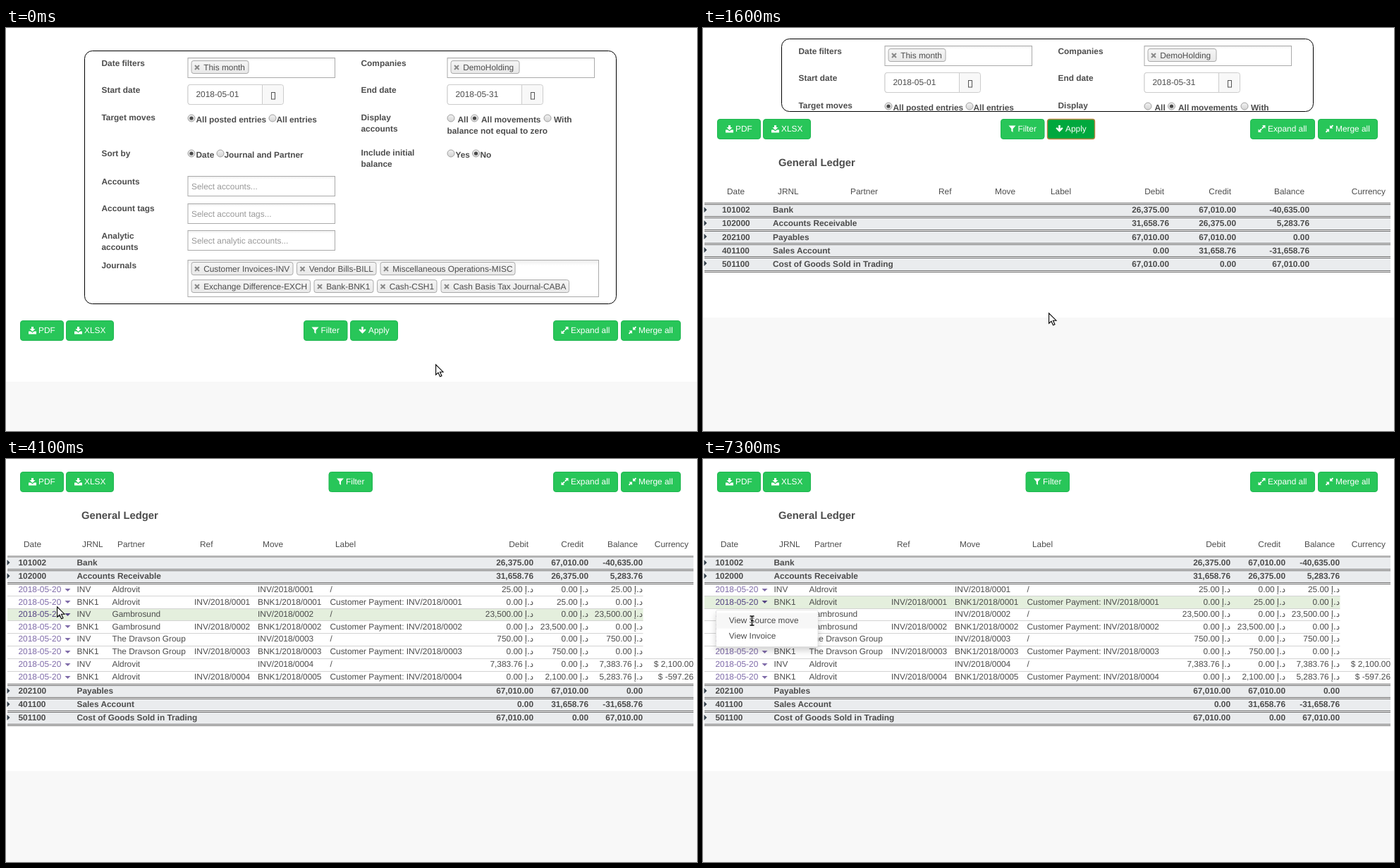
An HTML page for the animation above (8 s loop, 980 by 572 pixels).

```html
<!DOCTYPE html>
<html lang="en">
<head>
<meta charset="utf-8">
<title>General Ledger</title>
<style>
html, body { margin: 0; width: 100%; height: 100%; overflow: hidden; background: #fff; }
#stage { display: block; width: 980px; height: 572px; }
text { font: 11.88px "Liberation Sans", Arial, sans-serif; fill: #4c4c4c; white-space: pre; text-rendering: geometricPrecision; }
.b { font-weight: bold; }
.e { text-anchor: end; }
.w, .icon { fill: #fff; }
.ph { fill: #999; }
.title { font-size: 14.85px; font-weight: bold; }
.cur { font-family: "DejaVu Sans", sans-serif; text-anchor: end; }
.link { fill: #7f6ba9; }
.link.on { fill: #544383; }
.btn { fill: #28c659; stroke: #1eb650; }
.btn.on { fill: #00a83e; stroke: #009638; }
.field { fill: url(#sunk); stroke: #aaa; }
.tag { fill: url(#raised); stroke: #aaa; }
.menu { fill: #fff; stroke: #d9d9d9; stroke-width: .6; filter: drop-shadow(0 5px 5px rgba(0, 0, 0, .18)); }
.pointer { fill: #fff; stroke: #000; stroke-width: 1.1; }
</style>
</head>
<body>
<svg id="stage" viewBox="0 0 980 572">
  <defs>
    <linearGradient id="sunk" x2="0" y2="1"><stop offset=".01" stop-color="#eee"/><stop offset=".15" stop-color="#fff"/></linearGradient>
    <linearGradient id="raised" x2="0" y2="1"><stop offset=".2" stop-color="#f3f3f3"/><stop offset="1" stop-color="#e8e8e8"/></linearGradient>
    <linearGradient id="knob" x2="0" y2="1"><stop stop-color="#f2f2f2"/><stop offset="1" stop-color="#d4d4d4"/></linearGradient>
  </defs>
  <g id="scene"></g>
</svg>
<script>
const LOOP = 8000, STEP = 100;
const scene = document.getElementById('scene');

// y is the middle of the capitals; the baseline sits on a whole pixel
const text = (x, y, s, cls = '') => `<text x="${x}" y="${Math.round(y + 4.3)}" class="${cls}">${s}</text>`;
const box = (x, y, w, h, attrs) => `<rect x="${x}" y="${y}" width="${w}" height="${h}" ${attrs}/>`;
const edge = (x, y, w, h, attrs) => box(x + .5, y + .5, w - 1, h - 1, attrs);
const path = (d, attrs = '') => `<path d="${d}" ${attrs}/>`;
const group = (x, y, s) => `<g transform="translate(${x} ${y})">${s}</g>`;

// latest value whose start time has passed
const latest = (list, t) => list.reduce((v, [at, next]) => at <= t ? next : v, list[0][1]);

function glide(keys, t) {
  const i = keys.findIndex(k => k[0] > t);
  if (i === 0) return keys[0].slice(1);
  if (i < 0) return keys[keys.length - 1].slice(1);
  const [a, x0, y0] = keys[i - 1], [b, x1, y1] = keys[i], f = (t - a) / (b - a);
  return [x0 + (x1 - x0) * f, y0 + (y1 - y0) * f];
}

/* ---- filter panel ---- */
const label = (y, ...lines) => lines.map((s, i) => text(0, y + i * 16.3, s, 'b')).join('');
const field = (y, w, h, hint = '') => edge(0, y, w, h, 'class="field"') + text(5.5, y + 14.5, hint, 'ph');
const tag = (x, y, w, s) => edge(x, y, w, 19, 'rx="3" class="tag"') +
  path(`M${x + 5.5} ${y + 7}l6 6m0 -6l-6 6`, 'stroke="#888" stroke-width="2"') + text(x + 17.7, y + 9.5, s);
const radio = (x, y, on) => `<circle cx="${x}" cy="${y}" r="5" fill="url(#knob)" stroke="#a0a0a0"/>` +
  (on ? `<circle cx="${x}" cy="${y}" r="2.6" fill="#484848"/>` : '');
const dateBox = s => edge(0, 80, 136.5, 29, 'rx="3" fill="#f8f8f8" stroke="#ccc"') +
  path('M106 80.5H3.5q-3 0 -3 3v22q0 3 3 3H106z', 'fill="#fff" stroke="#ccc"') + text(12, 94, s) +
  edge(118.5, 91, 6, 10.5, 'fill="none" stroke="#555"');

function panelBody(narrow) {
  const [a, b, c, d] = narrow ? [-1, -3, -7, -9] : [0, 0, 0, 0];
  const names = label(49.5, 'Date filters') + label(87.5, 'Start date') + label(126.5, 'Target moves') +
    label(177.5, 'Sort by') + label(217.5, 'Accounts') + label(256, 'Account tags') +
    label(294.5, 'Analytic', 'accounts') + label(336.5, 'Journals');
  const left = field(42, 209.5, 29) + tag(5, 46, 82, 'This month') + dateBox('2018-05-01') +
    radio(5.5, 128, 1) + text(12, 129.5, 'All posted entries', 'b') + radio(120.5, 128) + text(126, 129.5, 'All entries', 'b') +
    radio(5.5, 178, 1) + text(12, 180, 'Date', 'b') + radio(46.5, 178) + text(52, 180, 'Journal and Partner', 'b') +
    field(210, 209.5, 29, 'Select accounts...') + field(249, 209.5, 29, 'Select account tags...') +
    field(287, 209.5, 29, 'Select analytic accounts...') +
    field(329, narrow ? 574 : 583.5, 53) +
    tag(5, 332, 145, 'Customer Invoices-INV') + tag(154.5, 332, 113.5, 'Vendor Bills-BILL') +
    tag(273, 332, 192, 'Miscellaneous Operations-MISC') + tag(5, 357, 169.5, 'Exchange Difference-EXCH') +
    tag(179, 357, 85, 'Bank-BNK1') + tag(268.5, 357, 85.5, 'Cash-CSH1') + tag(359, 357, 182.5, 'Cash Basis Tax Journal-CABA');
  const names2 = label(49.5, 'Companies') + label(87.5, 'End date') + label(126.5, 'Display', 'accounts') +
    label(176.5, 'Include initial', 'balance');
  const right = field(42, 209.5, 29) + tag(5, 46, 98, 'DemoHolding') + dateBox('2018-05-31') +
    radio(5.5, 128) + text(15, 129.5, 'All', 'b') + radio(39, 128, 1) + text(48.5, 129.5, 'All movements', 'b') +
    radio(142.5, 128) + text(151.5, 129.5, 'With', 'b') + text(0, 146, 'balance not equal to zero', 'b') +
    radio(5.5, 178) + text(12, 180, 'Yes', 'b') + radio(41, 178, 1) + text(47, 180, 'No', 'b');
  return group(135.5 + a, 0, names) + group(257.5 + b, 0, left) + group(503.5 + c, 0, names2) + group(625.5 + d, 0, right);
}

function panel(top, h, narrow) {
  const x = 111 - narrow, w = 755 - 12 * narrow;
  return `<svg x="${x}" y="${top}" width="${w}" height="${h}">${group(-x, -32, panelBody(narrow))}</svg>` +
    edge(x, top, w, h, 'rx="11" fill="none" stroke="#000"');
}

/* ---- buttons ---- */
const ICON = {
  load: 'M-5.5 1.5h3l2.5 2 2.5-2h3v4h-11zM-1.5-5h3v3h2.5l-4 4-4-4h2.5z',
  funnel: 'M-4.5-4.5h10l-4 4.5v5l-2.2-1.8v-3.2z',
  down: 'M-1.3-5h2.6v5l2.2-2 1.6 1.6-5.1 5.2-5.1-5.2 1.6-1.6 2.2 2z',
  grow: 'M5-5v4.5l-1.6-1.6-2.4 2.4-1.3-1.3 2.4-2.4-1.6-1.6zM-5 5v-4.5l1.6 1.6 2.4-2.4 1.3 1.3-2.4 2.4 1.6 1.6z',
  shrink: 'M.5-.5v-4.5l1.6 1.6 2.2-2.2 1.3 1.3-2.2 2.2 1.6 1.6zM-.5 .5v4.5l-1.6-1.6-2.2 2.2-1.3-1.3 2.2-2.2-1.6-1.6z'
};
const button = (x, w, pad, icon, s, on) => edge(x, 0, w, 29, `rx="3.5" class="btn ${on ? 'on' : ''}"`) +
  group(x + pad - 8.5, 14, path(ICON[icon], 'class="icon"')) + text(x + pad, 14, s, 'w');

function toolbar(y, narrow, hidden, hot, focus) {
  const mid = hidden ? 35.5 : narrow ? -7 : 0, end = narrow ? -14 : 0;
  let s = button(20, 62, 26, 'load', 'PDF') + button(85, 68, 26, 'load', 'XLSX') +
    button(422 + mid, 62.5, 24.5, 'funnel', 'Filter') +
    button(776 + end, 92, 25, 'grow', 'Expand all') + button(872 + end, 85, 25, 'shrink', 'Merge all');
  if (!hidden) {
    s += button(488 + mid, 68, 26, 'down', 'Apply', hot);
    if (focus) s += edge(488 + mid, 0, 68, 29, 'rx="3" fill="none" stroke="#b5843f" stroke-width="1.4"');
  }
  return group(0, y, s);
}

/* ---- ledger ---- */
const HEADS = ['Date', 'JRNL', 'Partner', 'Ref', 'Move', 'Label', 'Debit', 'Credit', 'Balance', 'Currency'];
const WIDE = { heads: [34, 106, 209, 334, 414, 493, 654, 749, 853, 968], code: 27, name: 99, right: 975 };
const NARROW = { heads: [34, 105, 207, 330, 409, 486.5, 644, 739, 842, 955], code: 27, name: 98, right: 962 };
const OPEN = { heads: [25, 108, 158, 275, 364, 467, 741, 819, 896, 968], code: 17.5, name: 100.5, right: 975 };
const ACCOUNTS = [
  ['101002', 'Bank', '26,375.00', '67,010.00', '-40,635.00'],
  ['102000', 'Accounts Receivable', '31,658.76', '26,375.00', '5,283.76'],
  ['202100', 'Payables', '67,010.00', '67,010.00', '0.00'],
  ['401100', 'Sales Account', '0.00', '31,658.76', '-31,658.76'],
  ['501100', 'Cost of Goods Sold in Trading', '67,010.00', '0.00', '67,010.00']
];
// partner, invoice number, payment number, sums of the invoice line, sums of the payment line
const DEALS = [
  ['Aldrovit', 1, 1, ['25.00', '0.00', '25.00'], ['0.00', '25.00', '0.00']],
  ['Gambrosund', 2, 2, ['23,500.00', '0.00', '23,500.00'], ['0.00', '23,500.00', '0.00']],
  ['The Dravson Group', 3, 3, ['750.00', '0.00', '750.00'], ['0.00', '750.00', '0.00']],
  ['Aldrovit', 4, 5, ['7,383.76', '0.00', '7,383.76', '$ 2,100.00'], ['0.00', '2,100.00', '5,283.76', '$ -597.26']]
];
const LINES = DEALS.flatMap(([who, inv, pay, sums, paid]) => {
  const ref = 'INV/2018/000' + inv;
  return [['INV', who, '', ref, '/', sums], ['BNK1', who, ref, 'BNK1/2018/000' + pay, 'Customer Payment: ' + ref, paid]];
});
const ROW = 19.1, EXTRA = 143.3;
const lineTop = i => 177 + 17.45 * i + Math.max(0, i - 4) * .6;

function rule(y, right, solid) {
  y = Math.round(y);
  return solid ? box(2, y, right - 2, 3, 'fill="#b4b4b4"') :
    box(2, y, right - 2, 3, 'fill="#fff"') + box(2, y, right - 2, 1, 'fill="#6a6a6a"') + box(2, y + 2, right - 2, 1, 'fill="#6a6a6a"');
}

function entries(hover, lit) {
  return LINES.map(([type, who, ref, move, note, sums], i) => {
    const top = Math.round(lineTop(i)), y = lineTop(i) + 8, row = i + 1, end = sums[3] ? 975 : 903.5;
    const link = 'link' + (row === lit ? ' on' : '');
    return (row === hover ? box(2, top, end - 2, 18, 'fill="#e4efdd"') : '') +
      (i ? box(2, top, (i > 5 ? 975 : 903.5) - 2, 1, 'fill="#d3d3d3"') : '') +
      text(17.5, y, '2018-05-20', link) + path(`M83.5 ${Math.round(y) - 1}h8l-4 4z`, `class="${link}"`) +
      text(100.5, y, type) + text(150.5, y, who) + text(267, y, ref) + text(357, y, move) + text(459.5, y, note) +
      [748, 826, 903].map((x, k) => text(x - 15.3, y, sums[k], 'e') + text(x, y, 'د.إ', 'cur')).join('') +
      text(975, y, sums[3] || '', 'e');
  }).join('');
}

function ledger(y, cols, open, hover, lit) {
  let s = text(cols === NARROW ? 105 : 107, y + 62.8, 'General Ledger', 'title') +
    HEADS.map((h, i) => text(cols.heads[i], y + 102.7, h, i > 5 ? 'e' : '')).join('');
  let rules = '';
  ACCOUNTS.forEach(([code, name, ...sums], i) => {
    const top = y + 119 + ROW * i + (open && i > 1 ? EXTRA : 0), mid = top + 10;
    s += box(2, Math.round(top) + 1, cols.right - 2, 19, 'fill="#eaecee"') +
      path(`M1.5 ${Math.round(mid) - 4}l4 4 -4 4z`, 'fill="#333f4a"') +
      text(cols.code, mid, code, 'b') + text(cols.name, mid, name, 'b') +
      sums.map((v, k) => text(cols.heads[6 + k] + 7, mid, v, 'b e')).join('');
    rules += rule(top, cols.right, open && !i) + rule(top + ROW, cols.right);
  });
  return s + (open ? entries(hover, lit) : '') + rules;
}

/* ---- overlays ---- */
function menu(top, items, lit) {
  return edge(18, top, 145.5, 9 + 22 * items.length, 'rx="2" class="menu"') +
    (lit ? box(19, top + 4.5, 143.5, 22, 'fill="#f7f7f7"') : '') +
    items.map((s, i) => text(36.8, top + 15 + 21.8 * i, s)).join('');
}

function scrollbar(docHeight) {
  return box(967, 0, 13, 572, 'fill="#f1f1f1"') + box(968, 13, 11, 546 * 572 / docHeight, 'fill="#c1c1c1"') +
    path('M970 8.5h7l-3.5 -4z', 'fill="#a3a3a3"') + path('M970 563.5h7l-3.5 4z', 'fill="#505050"');
}

const BEAM = 'M.5 1h2q1 0 1 1v11q0 1 -1 1h-2M6.5 1h-2q-1 0 -1 1v11q0 1 1 1h2M2 7.5h3';
const POINTER = {
  arrow: path('M.6 .8V15.2L4 12.2L6.6 17.8L9 16.7L6.5 11.2H11z', 'class="pointer"'),
  hand: path('M3 9V2q0-1.5 1.5-1.5T6 2V6.5l6 1.2q2 .5 2 2.3l-1 5.5H6L1 10.5q-.6-1.5 1-1.8z', 'class="pointer"') +
    path('M8.6 7v2.6M11.2 7.5v2.4', 'class="pointer"'),
  beam: path(BEAM, 'fill="none" stroke="#fff" stroke-width="2.6"') + path(BEAM, 'fill="none" stroke="#000" stroke-width="1.3"')
};
const KIND = [[0, 'arrow'], [700, 'hand'], [1500, 'arrow'], [2200, 'hand'], [3200, 'arrow'], [4400, 'hand'], [7100, 'beam']];
const TRACK = [
  [200, 609, 477], [800, 520, 430], [1400, 520, 430], [1800, 459, 377], [2000, 217, 190], [2300, 213, 168],
  [3100, 213, 168], [3200, 217, 204], [3700, 110, 229], [3800, 110, 229], [4100, 72, 209], [4300, 72, 209],
  [4400, 68, 209], [4700, 68, 209], [4800, 57, 219], [5600, 57, 219], [5700, 57, 221], [5800, 57, 221],
  [5900, 62, 219], [6000, 62, 219], [6300, 62, 199], [7000, 62, 199], [7100, 66, 220], [7200, 66, 220], [7300, 66, 222]
];
const HOVER = [[0, 2], [3400, 3], [3600, 4], [4000, 3], [4200, 2], [4800, 3], [6200, 2]];
const LIT = [[0, 0], [4100, 3], [4200, 0], [4400, 2], [4800, 3], [6200, 2]];

function draw(t) {
  const loaded = t >= 1300, hidden = t >= 1900, open = t >= 3200;
  const run = Math.min(1, Math.max(0, (t - 1280) / 500));
  const p = .5 + Math.cos(run * Math.PI) / 2;
  const top = Math.round(8.5 + 23 * p), h = Math.floor(2 + 358 * p);
  const y = hidden ? 18 : top + h + Math.round(9.1 + 14 * p * p);
  const narrow = loaded && y + 249 > 572 ? 1 : 0;
  const pageEnd = y + (loaded ? 282 : 87) + (open ? EXTRA : 0);

  let s = box(0, Math.round(pageEnd), 980, 572, 'fill="#f8f8f8"');
  if (!hidden) s += panel(top, h, narrow);
  s += toolbar(y, narrow, hidden, t >= 700, t >= 1200);
  if (loaded) s += ledger(y, open ? OPEN : narrow ? NARROW : WIDE, open, latest(HOVER, t), latest(LIT, t));
  if (narrow) s += scrollbar(y + 249);
  if (t >= 4800 && t < 7100) s += edge(-3, 567, 192, 12, 'rx="3" fill="#f2f2f2" stroke="#d0d0d0"');
  if (t >= 5300 && t < 6100) s += menu(232, ['View Source move']);
  if (t >= 6400) s += menu(214, ['View Source move', 'View Invoice'], t >= 7100);
  const [x, cy] = glide(TRACK, t);
  scene.innerHTML = s + group(Math.round(x), Math.round(cy), POINTER[latest(KIND, t)]);
}

let shown = -1;
const start = performance.now();
function tick() {
  const t = Math.floor((performance.now() - start) % LOOP / STEP) * STEP;
  if (t !== shown) draw(shown = t);
  requestAnimationFrame(tick);
}
tick();
</script>
</body>
</html>
```
